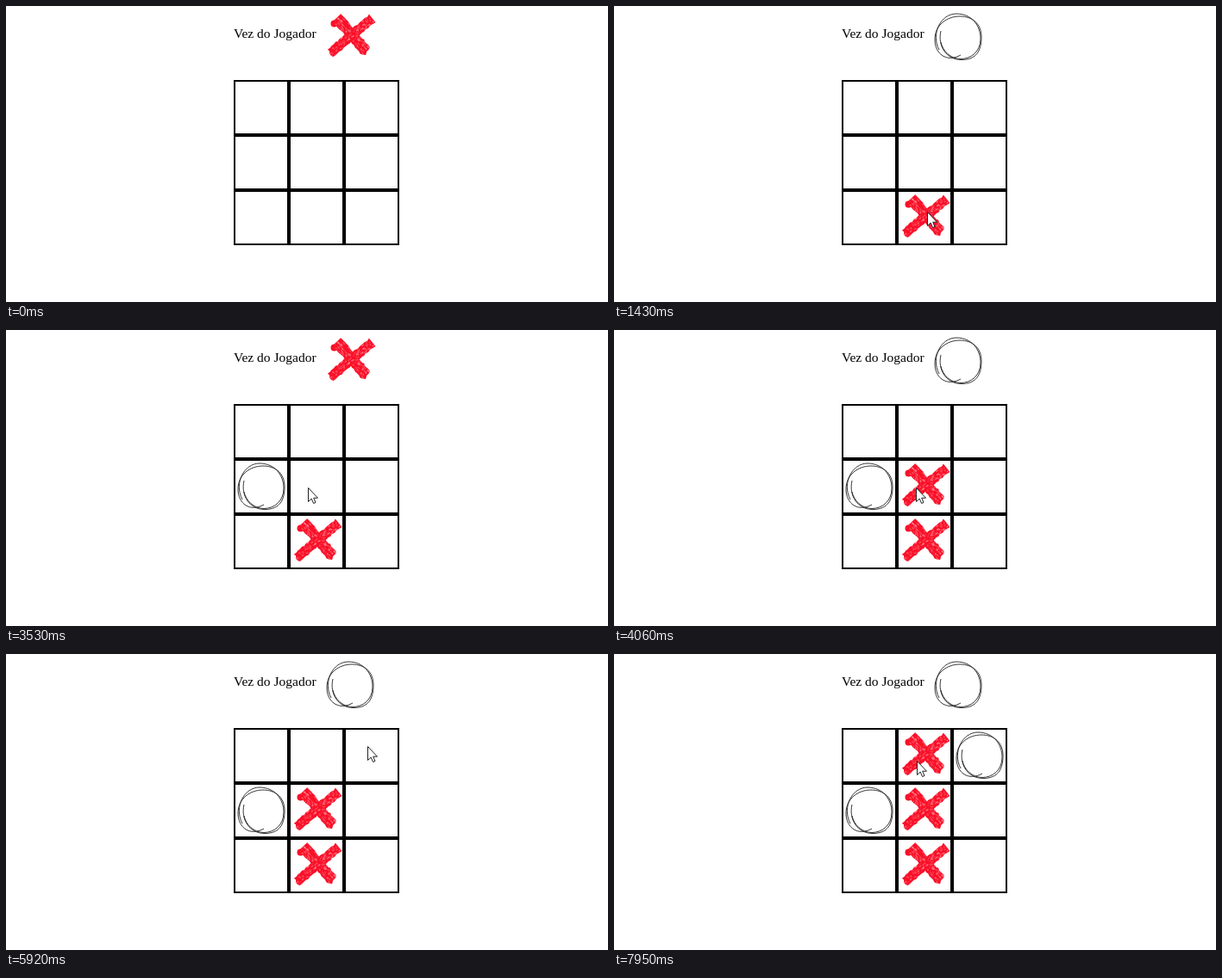
Recreate the animation shown at these times as an HTML page. Size 698 px wide and 344 px high, loop 8000 ms.

```html
<!DOCTYPE html>
<html lang="pt">
<head>
<meta charset="utf-8">
<style>
html, body { margin: 0; width: 100%; height: 100%; overflow: hidden; background: #fff; }
svg { display: block; width: 698px; height: 344px; }
text { font: 15.5px "Liberation Serif", "Times New Roman", serif; }
</style>
</head>
<body>
<svg viewBox="0 0 698 344">
  <defs>
    <g id="X" fill="#fa1028"><circle cx="10.5" cy="12.5" r="4"/></g>
    <g id="O" fill="none" stroke="#222" stroke-width=".9">
      <path d="M9 21C5 38 15 54.5 33 54.5S56 43 56 28S46 4 31 4S2 14 2 31S16 58 32 49"/>
      <path d="M7 43C-3 24 9 1 27 1S55 15 55 30S44 53.5 32 53.5S11 44 9 34"/>
    </g>
  </defs>
  <text x="264" y="37">Vez do Jogador</text>
  <use id="turn" x="370" y="8"/>
  <g id="board" fill="none" stroke="#000" stroke-width="2"></g>
  <g id="marks"></g>
  <g id="pointer">
    <circle id="press" r="12" fill="#ff0" fill-opacity=".47"/>
    <path d="M.5 .5V16.5L4.2 13.1L6.6 18.5L9 17.5L6.7 12.2H11.5Z" fill="#fff" stroke="#222"/>
  </g>
</svg>
<script>
const NS = "http://www.w3.org/2000/svg";
const LOOP = 8000, STEP = 76, HOLD = 150, CELL = 64;
const $ = id => document.getElementById(id);

function add(parent, tag, attrs) {
  const node = document.createElementNS(NS, tag);
  for (const key in attrs) node.setAttribute(key, attrs[key]);
  return parent.appendChild(node);
}

for (let i = 0; i < 9; i++) {
  add($("board"), "rect", {
    x: 265 + (i % 3) * CELL, y: 87 + Math.floor(i / 3) * CELL, width: CELL - 2, height: CELL - 2
  });
}

let seed = 11;
const rand = () => (seed = (seed * 16807) % 2147483647) / 2147483647;
const jitter = size => (rand() - 0.5) * size;

// A straight dry-brush stroke with ragged edges and pale flecks
function brush(x1, y1, x2, y2, width) {
  const length = Math.hypot(x2 - x1, y2 - y1);
  const angle = Math.atan2(y2 - y1, x2 - x1) * 180 / Math.PI;
  const g = add($("X"), "g", { transform: `translate(${x1} ${y1}) rotate(${angle})` });
  const top = [], bottom = [];
  for (let x = 0; x <= length; x += 3) {
    top.push([x + jitter(2), -width / 2 + jitter(1.6)]);
    bottom.unshift([x + jitter(2), width / 2 + jitter(1.6)]);
  }
  const tip = [0, 1, 2].map(i => [length + jitter(3), (i - 1) * width / 4]);
  add(g, "polygon", { points: [...top, ...tip, ...bottom].join(" ") });
  for (let i = 0; i < 90; i++) {
    add(g, "ellipse", {
      cx: length * rand(), cy: jitter(width), rx: 0.6 + rand() * 1.6, ry: 0.4 + rand() * 0.6,
      fill: "#fff", "fill-opacity": 0.1 + rand() * 0.25
    });
  }
}
brush(14, 6, 49, 46, 13);
brush(55, 6, 6, 47, 11);

// Pointer stretches: start time, number of steps, end point
const entry = [614, 342];
const legs = [
  [430, 7, 347, 207], [962, 4, 363, 239], [1830, 2, 354, 230], [2070, 3, 307, 177],
  [2680, 2, 303, 178], [2990, 5, 350, 183], [4610, 6, 293, 239],
  [5610, 5, 419, 107], [6240, 2, 441, 116], [7020, 4, 351, 124]
];

// Moves: placing time, column, row
const moves = [[1430, 1, 2], [2530, 0, 1], [4060, 1, 1], [6560, 2, 0], [7950, 1, 0]];
const player = i => i % 2 ? "#O" : "#X";
const marks = moves.map(([, col, row], i) => add($("marks"), "use", {
  href: player(i), x: 267 + col * CELL, y: 90 + row * CELL
}));

const show = (node, on) => node.setAttribute("visibility", on ? "visible" : "hidden");
const ease = p => p * p * (3 - 2 * p);

function pointerAt(t) {
  const i = legs.filter(leg => leg[0] <= t).length - 1;
  if (i < 0) return null;
  const [start, steps, ...to] = legs[i];
  const from = i ? legs[i - 1].slice(2) : entry;
  const done = Math.min(steps, 1 + Math.floor((t - start) / STEP));
  return to.map((end, k) => Math.round(from[k] + (end - from[k]) * ease(done / steps)));
}

function draw(t) {
  const spot = pointerAt(t);
  $("pointer").setAttribute("display", spot ? "inline" : "none");
  if (spot) $("pointer").setAttribute("transform", `translate(${spot})`);
  show($("press"), moves.some(([placed]) => t >= placed - HOLD && t < placed));
  moves.forEach(([placed], i) => show(marks[i], t >= placed));
  $("turn").setAttribute("href", player(moves.filter(([placed]) => t >= placed).length));
}

const begin = performance.now();
function tick() {
  draw((performance.now() - begin) % LOOP);
  requestAnimationFrame(tick);
}
tick();
</script>
</body>
</html>
```
